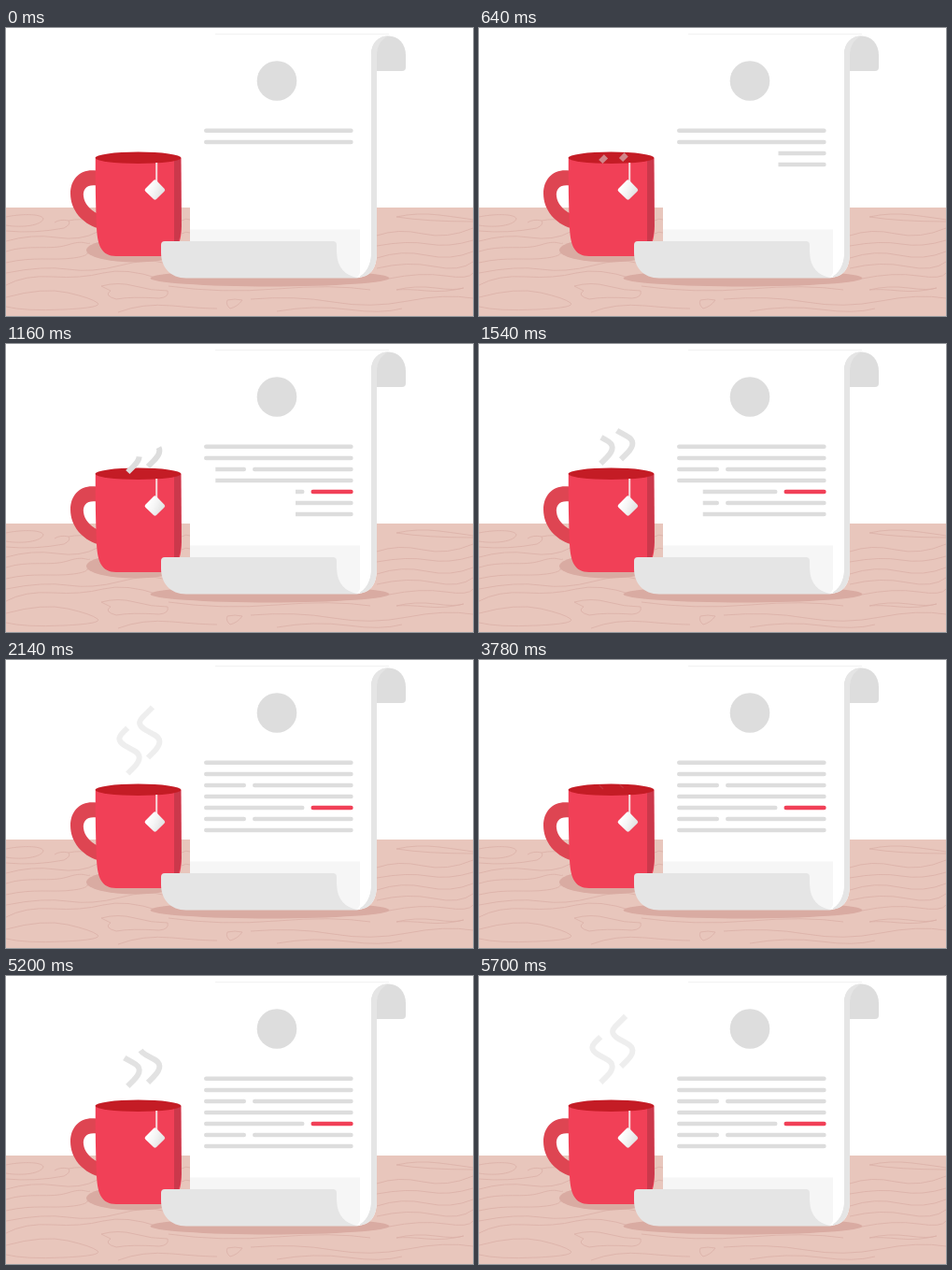
Recreate the animation shown at these times as an HTML page with a canvas. Size 500 px wide and 308 px high, loop 7.2 s.

```html
<!DOCTYPE html>
<html lang="en">
<head>
<meta charset="utf-8">
<title>Letter and tea</title>
<style>
html, body { margin: 0; width: 100%; height: 100%; overflow: hidden; background: #fff; }
canvas { display: block; width: 500px; height: 308px; }
</style>
</head>
<body>
<canvas id="stage" width="500" height="308"></canvas>
<script>
const ctx = document.getElementById('stage').getContext('2d');
const LOOP = 7200;
const RED = '#f14057', GREY = '#dddddd', ROLL = '#e5e5e5';

function fill(path, color) {
  ctx.fillStyle = color;
  ctx.fill(typeof path === 'string' ? new Path2D(path) : path, 'evenodd');
}

function stroke(path, color, width) {
  ctx.strokeStyle = color;
  ctx.lineWidth = width;
  ctx.stroke(new Path2D(path));
}

function ellipse(x, y, rx, ry, color) {
  const p = new Path2D();
  p.ellipse(x, y, rx, ry, 0, 0, Math.PI * 2);
  fill(p, color);
}

function bar(x1, x2, y, color = GREY) {
  const p = new Path2D();
  p.roundRect(x1, y - 2.3, x2 - x1, 4.6, 2.3);
  fill(p, color);
}

// Piecewise linear interpolation
function track(t, times, values) {
  if (t <= times[0]) return values[0];
  for (let i = 1; i < times.length; i++) {
    if (t < times[i]) {
      const k = (t - times[i - 1]) / (times[i] - times[i - 1]);
      return values[i - 1] + (values[i] - values[i - 1]) * k;
    }
  }
  return values[values.length - 1];
}

const GRAIN = [
  'M0 202C14 199 38 198 40 204C38 211 18 214 0 211',
  'M52 208Q58 204 67 206Q70 210 62 214Q30 220 0 217',
  'M67 206Q80 203 96 207',
  'M0 228Q28 220 54 224T98 218',
  'M0 239C24 231 48 238 66 232S86 232 90 230',
  'M0 251C30 244 50 249 72 246S84 239 88 241',
  'M0 262Q40 254 66 258T122 254T168 251',
  'M0 275Q20 264 50 266T104 262T164 268',
  'M102 276Q120 271 138 276T173 281Q175 288 164 289Q134 287 118 290Q104 286 112 281Z',
  'M0 288Q40 277 66 283T98 294T62 301T0 298',
  'M120 304Q146 294 178 297T226 300',
  'M174 276Q230 284 290 279T390 280',
  'M237 291Q245 289 253 291Q248 298 240 300Q235 296 237 291',
  'M262 290Q310 286 350 293T430 292T500 289',
  'M290 303Q330 296 366 301T424 300',
  'M418 202Q440 197 464 200T500 205M418 202Q450 207 500 207',
  'M397 222Q420 214 446 220T500 214',
  'M397 233Q430 227 452 231T500 227',
  'M397 246Q424 237 450 243T500 239',
  'M397 257Q430 249 458 255T500 250',
  'M410 268Q444 261 470 265T500 262',
  'M418 280Q438 275 460 278T490 278Q470 283 450 281T418 280',
  'M188 206Q193 203 197 205M188 220Q193 217 197 219'
];

function drawTable() {
  fill('M0 192H500V308H0Z', '#e8c6bc');
  for (const line of GRAIN) stroke(line, '#dbb0a7', 0.8);
  ellipse(138, 237.5, 52, 13, '#d9aba2');
  ellipse(282.5, 267.5, 128, 9, '#d9aba2');
}

function drawCup() {
  const outer = 'M97 152.5C80 150 69 161 69 177C69 195 82 209 98 214Z';
  const hole = 'M97 168.5C87 167 82 172 83 180C84 188 90 194 97 198Z';
  fill(outer + hole, '#de4552');
  fill('M95.8 139H187.3L187.8 212C188 232 181 244 166 244H118C102 244 98 232 97 214Q95.5 180 95.8 139Z', RED);
  fill('M180 139H187.3L187.8 212Q187 228 180 236Z', '#cb384b');
  ellipse(141.5, 138.8, 46, 6.2, '#c41c25');
  fill('M160.2 144H162.2V166H160.2Z', '#f6d9dc');
  const shade = ctx.createLinearGradient(152, 170, 168, 177);
  shade.addColorStop(0, '#ffffff');
  shade.addColorStop(0.45, '#f5f5f5');
  shade.addColorStop(1, '#e2e2e2');
  fill('M158 163Q159.5 161.5 161 163L169.5 171.7Q171 173.2 169.5 174.7L161 183Q159.5 184.5 158 183L149.3 174.7Q147.8 173.2 149.3 171.7Z', shade);
}

function drawPaper() {
  fill('M197 7H397V240Q397 267 375 267H197Z', '#ffffff');
  stroke('M224 6.5H410', '#f2f2f2', 1);
  // top curl
  fill('M391 28C391 16 399 8.5 409.5 8.5C420 8.5 428 17 428 29V42Q428 46 424 46H391Z', GREY);
  fill('M391 28C391 16 399 8.5 409.5 8.5Q397 14 397 30V241C397 258 389 267 375 267Q391 261 391 238Z', ROLL);
  // bottom curl
  fill('M197 215.5H379V267H197Z', '#f6f6f6');
  fill('M379 215.5H391V238Q391 260 376 267L379 262Z', '#ffffff');
  fill('M170 228H350Q354 228 354 232V240Q355 264 378 267.5H193C176 267.5 166 256 166 240V232Q166 228 170 228Z', ROLL);
  ellipse(290, 56.5, 21.3, 21.3, GREY);
}

// Shows the drawing only to the right of the given edge
function reveal(edge, draw) {
  if (edge >= 372) return;
  ctx.save();
  ctx.beginPath();
  ctx.rect(edge, 100, 400 - edge, 100);
  ctx.clip();
  draw();
  ctx.restore();
}

function splitBar(y) {
  bar(212, 257, y);
  bar(264, 371.7, y);
}

function drawText(t) {
  bar(212, 371.7, 109.8);
  bar(212, 371.7, 122);
  reveal(Math.max(210, 320.5 - 0.185 * (t - 640)), () => {
    splitBar(134);
    bar(212, 371.7, 146);
  });
  reveal(Math.max(210, 310 - 0.185 * (t - 1160)), () => {
    bar(212, 319.5, 158);
    bar(326.5, 371.7, 158, RED);
    splitBar(170);
    bar(212, 371.7, 182);
  });
}

const WISP = new Path2D('M0 0L6 -6C15 -15 14 -21 6 -25L-3 -30C-11 -35 -10 -39 -5 -44L5 -54');
const STEPS = [0, 440, 720, 960, 1460, 1940];
const WISPS = [
  { x: 130.3, y: [144, 143, 141, 137, 125, 121.5], length: [1, 8, 15, 21, 44, 67] },
  { x: 152, y: [143, 141, 137.5, 131, 121, 104.5], length: [1, 8, 18, 25, 50, 75] }
];

function drawSteam(age, lift) {
  ctx.save();
  ctx.globalAlpha = track(age, STEPS, [0.1, 0.55, 0.85, 1, 0.85, 0.5]);
  ctx.strokeStyle = GREY;
  ctx.lineWidth = 6;
  for (const wisp of WISPS) {
    ctx.save();
    ctx.translate(wisp.x, track(age, STEPS, wisp.y) - lift);
    ctx.setLineDash([track(age, STEPS, wisp.length), 200]);
    ctx.stroke(WISP);
    ctx.restore();
  }
  ctx.restore();
}

function draw(t) {
  ctx.fillStyle = '#ffffff';
  ctx.fillRect(0, 0, 500, 308);
  drawTable();
  drawCup();
  drawPaper();
  drawText(t);
  if (t >= 3780) drawSteam(t - 3760, 7.6);
  else if (t >= 200) drawSteam(t - 200, 0);
}

const start = performance.now();
function frame() {
  const t = (performance.now() - start) % LOOP;
  draw(Math.floor(t / 20) * 20);
  requestAnimationFrame(frame);
}
frame();
</script>
</body>
</html>
```
